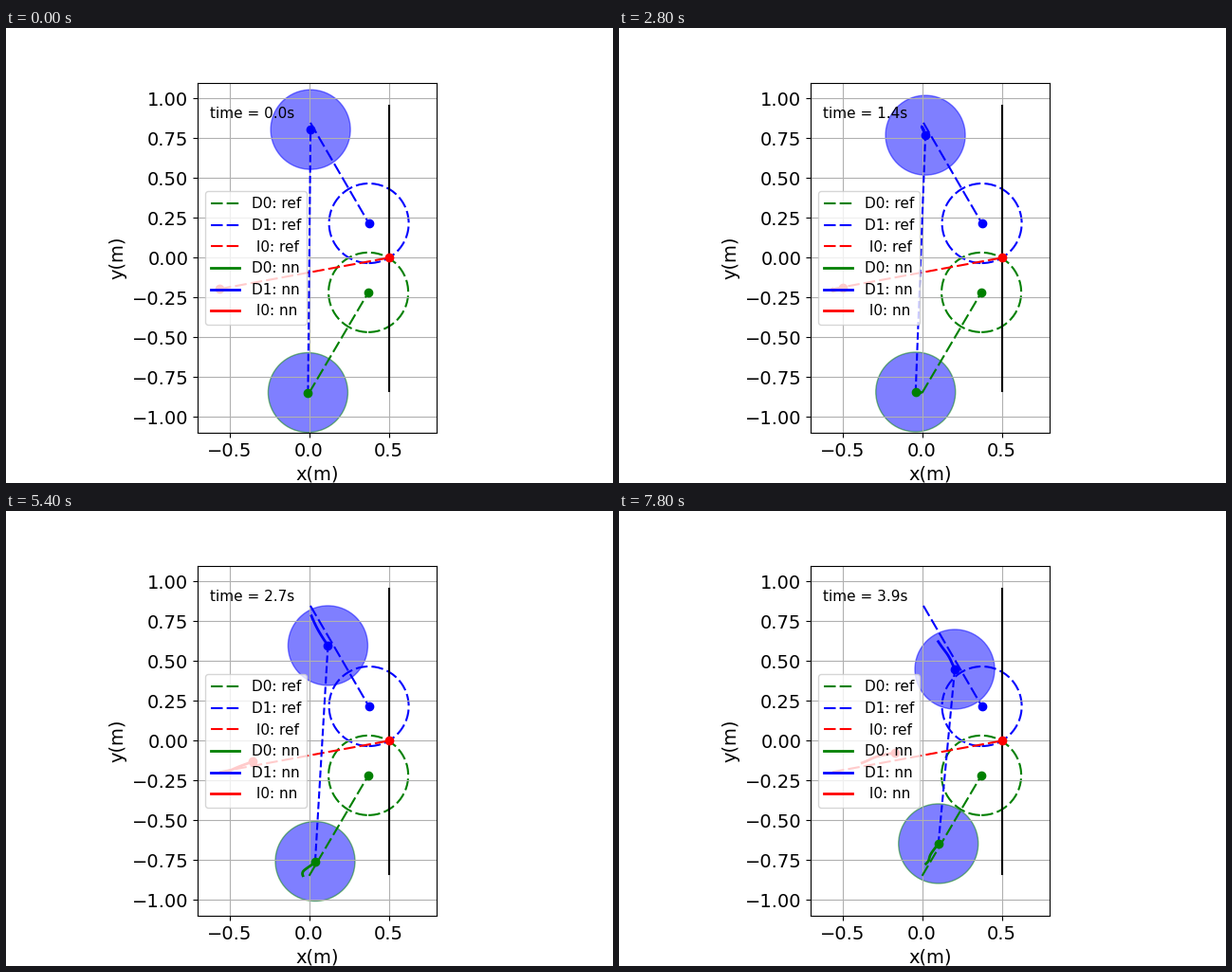
A matplotlib script for the animation above (8 s loop, 640x480 px).

```python
import matplotlib.pyplot as plt
import numpy as np
from matplotlib.animation import FuncAnimation
from matplotlib.patches import Circle

FRAMES = 40
DT = 0.1
TRAIL = 14
RADIUS = 0.25
DASH = (0, (6, 2))
COLORS = {"D0": "green", "D1": "blue", "I0": "red"}
LABELS = {"D0": "D0", "D1": "D1", "I0": " I0"}

# Planned straight runs (start, end), in metres
REFS = {
    "D0": ((0.0, -0.848), (0.372, -0.217)),
    "D1": ((0.008, 0.848), (0.375, 0.2165)),
    "I0": ((-0.563, -0.196), (0.5, 0.0)),
}

# Waypoints of the simulated motion at shared times, in metres
TIMES = np.array([0, 1.0, 1.8, 2.7, 3.2, 3.9])
WAYPOINTS = {
    "D0": [(-0.007, -0.846), (-0.033, -0.857), (-0.038, -0.821),
           (0.038, -0.757), (0.052, -0.716), (0.102, -0.646)],
    "D1": [(0.009, 0.805), (0.001, 0.816), (0.048, 0.711),
           (0.118, 0.598), (0.163, 0.536), (0.205, 0.449)],
    "I0": [(-0.563, -0.195), (-0.549, -0.208), (-0.444, -0.164),
           (-0.355, -0.130), (-0.289, -0.101), (-0.173, -0.075)],
}


def spline(points, t):
    """Cubic Hermite curve through the waypoints, one (x, y) row per time."""
    p = np.array(points)
    slope = np.gradient(p, TIMES, axis=0)
    i = np.clip(np.searchsorted(TIMES, t, side="right") - 1, 0, len(TIMES) - 2)
    h = (TIMES[i + 1] - TIMES[i])[:, None]
    s = (t - TIMES[i])[:, None] / h
    start = (1 + 2 * s) * p[i] + s * h * slope[i]
    end = (3 - 2 * s) * p[i + 1] - (1 - s) * h * slope[i + 1]
    return (1 - s) ** 2 * start + s ** 2 * end


paths = {name: spline(points, np.arange(FRAMES) * DT)
         for name, points in WAYPOINTS.items()}

fig, ax = plt.subplots(figsize=(6.4, 4.8), dpi=100)
ax.set_aspect("equal")
ax.set_xlim(-0.7, 0.8)
ax.set_ylim(-1.1, 1.1)
ax.tick_params(labelsize=14)
ax.set_xlabel("x(m)", fontsize=14)
ax.set_ylabel("y(m)", fontsize=14)
ax.grid(True)

ax.plot([0.5, 0.5], [-0.837, 0.955], color="black", lw=1.5)
for name, (start, end) in REFS.items():
    color = COLORS[name]
    ax.plot(*zip(start, end), color=color, lw=1.5, ls=DASH, label=LABELS[name] + ": ref")
    ax.plot(*end, "o", color=color)
    if name != "I0":
        ax.add_patch(Circle(end, RADIUS, fill=False, ec=color, lw=1.5, ls=DASH))

trails, dots, discs = {}, {}, {}
for name, color in COLORS.items():
    trails[name], = ax.plot([], [], color=color, lw=2, label=LABELS[name] + ": nn")
link, = ax.plot([], [], "--", color="blue", lw=1.5)
for name, color in COLORS.items():
    dots[name], = ax.plot([], [], "o", color=color)
    if name != "I0":
        discs[name] = ax.add_patch(Circle((0, 0), RADIUS, fc="blue", ec=color, alpha=0.5))

clock = ax.text(0.05, 0.9, "", transform=ax.transAxes, fontsize=11)
ax.legend(loc="center left", fontsize=11)


def draw(k):
    for name, path in paths.items():
        trails[name].set_data(*path[max(0, k - TRAIL):k + 1].T)
        dots[name].set_data(*path[k:k + 1].T)
        if name in discs:
            discs[name].center = path[k]
    link.set_data(*zip(paths["D0"][k], paths["D1"][k]))
    clock.set_text(f"time = {k * DT:.1f}s")
    return [*trails.values(), *dots.values(), *discs.values(), link, clock]


anim = FuncAnimation(fig, draw, frames=FRAMES, interval=200, repeat=True, repeat_delay=0)
plt.show()
```
